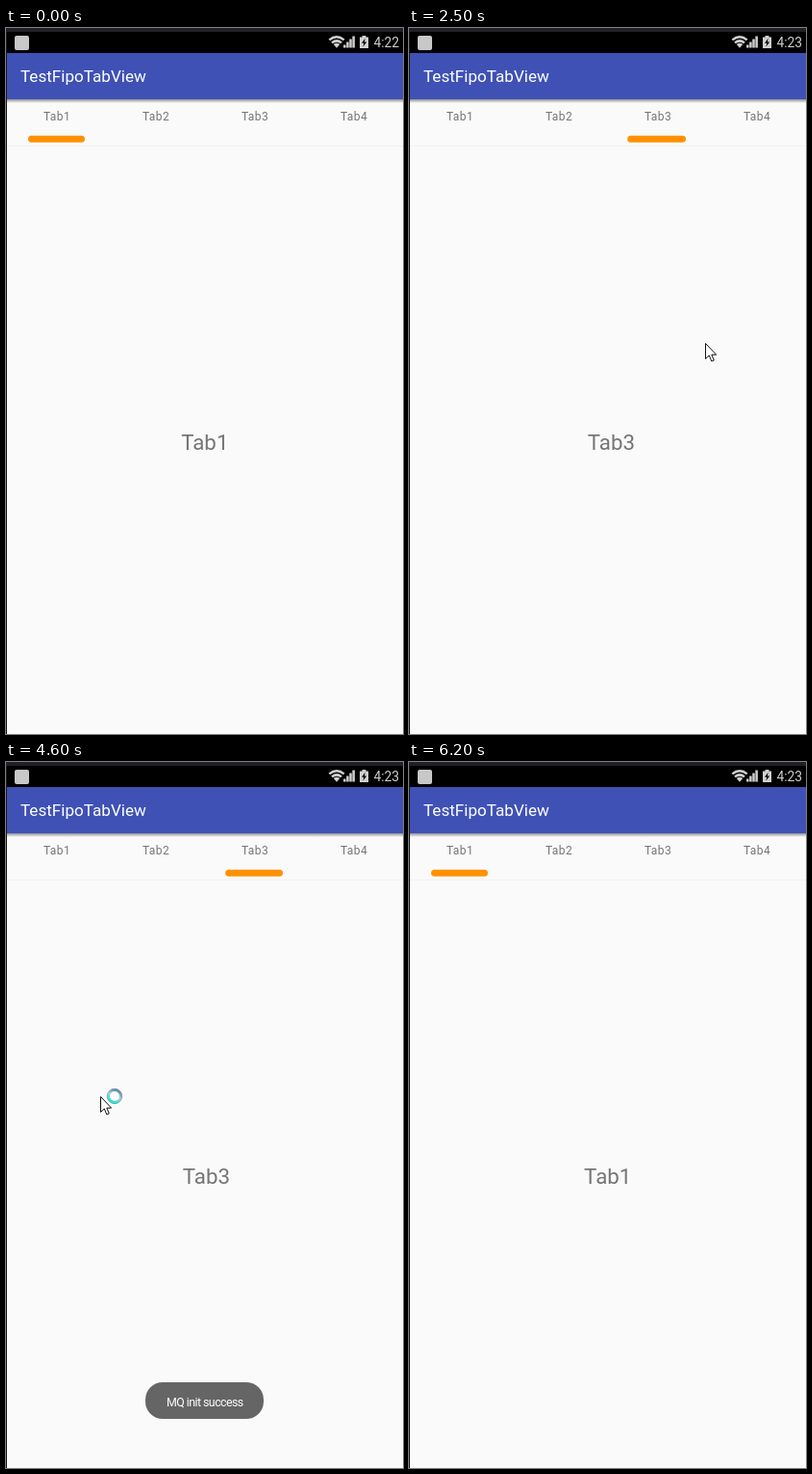
Write an HTML page that moves like this. It is 413 px wide and 733 px high and loops after 7200 ms.

```html
<!DOCTYPE html>
<html lang="en">
<head>
<meta charset="utf-8">
<title>Tab view</title>
<style>
  html, body { margin: 0; width: 100%; height: 100%; overflow: hidden; background: #fafafa; }
  svg { display: block; width: 413px; height: 733px; font-family: Roboto, "Noto Sans", sans-serif; }
  .label, .page { fill: #757575; text-anchor: middle; }
  .label { font-size: 12px; letter-spacing: .4px; }
  .page { font-size: 22.3px; }
</style>
</head>
<body>
<svg viewBox="0 0 413 733">
  <defs>
    <linearGradient id="shade" x2="0" y2="1">
      <stop stop-color="#000" stop-opacity=".42"/>
      <stop offset="1" stop-color="#000" stop-opacity="0"/>
    </linearGradient>
    <linearGradient id="busy" x1=".8" x2=".3" y2="1">
      <stop offset=".1" stop-color="#6790ac"/>
      <stop offset=".5" stop-color="#a9cfda"/>
      <stop offset=".9" stop-color="#2be6d2"/>
    </linearGradient>
  </defs>
  <rect width="413" height="733" fill="#fafafa"/>

  <g id="pages"></g>
  <path d="M0 122.5H413" stroke="#f2f2f2"/>
  <g id="labels"></g>
  <path id="bar" stroke="#ff9100" stroke-width="7" stroke-linecap="round"/>

  <rect y="74" width="413" height="4" fill="url(#shade)"/>
  <rect y="26" width="413" height="48" fill="#3f51b5"/>
  <text x="15" y="56" font-size="17.1" fill="#fff">TestFipoTabView</text>

  <rect width="413" height="26"/>
  <rect width="413" height="4" fill="#202127"/>
  <rect x="9" y="8" width="15" height="15" rx="2" fill="#c8c8c8"/>
  <g fill="none" stroke="#d0d0d0" stroke-width="2.5">
    <path d="M336.3 12.4Q344 6.2 351.7 12.4M339 15.4Q344 11.3 349 15.4"/>
    <path d="M340.8 17Q344 14.6 347.2 17L344 20.8Z" fill="#d0d0d0" stroke="none"/>
    <path d="M352.3 17.5V20.5M355.4 14.5V20.5M358.5 11.5V20.5M361.6 8.5V20.5"/>
  </g>
  <path d="M370.5 8H374.5V9.5H377V21H368V9.5H370.5Z" fill="#d0d0d0"/>
  <path d="M373.6 10.8L370 15.8H372.2L371.4 19.6L375.2 14.4H373Z"/>
  <text id="clock" x="409" y="20" font-size="13.8" fill="#cfcfcf" text-anchor="end"></text>

  <g id="toast">
    <rect x="145" y="644" width="123" height="38" rx="18" fill="#656565"/>
    <text x="167" y="668.5" font-size="12.4" letter-spacing="-.55" fill="#fff">MQ init success</text>
  </g>

  <g id="cursor">
    <path d="M.5 .5V16.5L4.3 13L6.8 19L9.3 18L6.8 12.2H11.6Z" fill="#fff" stroke="#111"/>
    <g id="ring" transform="translate(15)" fill="none">
      <circle r="6.5" fill="#fff" stroke="url(#busy)" stroke-width="2.8"/>
      <circle r="7.8" stroke="#5b7f92" stroke-width=".5"/>
    </g>
  </g>
  <path d="M.5 4V733" stroke="#17171a"/>
</svg>
<script>
const $ = id => document.getElementById(id);
const LOOP = 7200, TICK = 100, PAGE = 412, TAB = 103;

// Ticks at which a swipe is halfway to the next or the previous page
const forward = [14.84, 22.36, 31], back = [35.99, 49.07, 56.9];

// Turning points of the pointer: tick, x, y
const pointer = [
  [2, 278, 227], [6, 106, 339], [7, 106, 340], [10, 268, 341], [11, 268, 341],
  [16, 209, 334], [19, 340, 330], [22, 232, 329], [25, 308, 327], [34, 140, 352],
  [37, 251, 354], [46, 98, 347], [49, 215, 350], [54, 131, 349], [61, 392, 253]
];

const clamp = v => Math.max(0, Math.min(1, v));
const stretch = p => clamp(2 * p + 3.6 * p * p);
const swiped = (n, mids) => mids.reduce((sum, mid) => sum + 1 / (1 + Math.exp(1.8 * (mid - n))), 0);

function pointerAt(n) {
  const i = Math.max(1, pointer.findIndex(k => k[0] >= n));
  const [t0, x0, y0] = pointer[i - 1], [t1, x1, y1] = pointer[i];
  const u = (n - t0) / (t1 - t0);
  return [x0 + (x1 - x0) * u, y0 + (y1 - y0) * u];
}

function addText(parent, cls, x, y, text) {
  const el = document.createElementNS("http://www.w3.org/2000/svg", "text");
  el.setAttribute("class", cls);
  el.setAttribute("x", x);
  el.setAttribute("y", y);
  el.textContent = text;
  $(parent).append(el);
}

for (let i = 0; i < 4; i++) {
  addText("labels", "label", 53 + TAB * i, 96, "Tab" + (i + 1));
  addText("pages", "page", 206.8 + PAGE * i, 438, "Tab" + (i + 1));
}

function draw(now) {
  const n = Math.floor(now % LOOP / TICK);
  const pos = swiped(n, forward) - swiped(n, back);
  const page = Math.floor(pos), p = pos - page;
  $("pages").setAttribute("transform", `translate(${-PAGE * pos})`);

  // The leading end runs ahead, the trailing end catches up
  const left = 26.5 + TAB * (page + 1 - stretch(1 - p));
  const right = 78.5 + TAB * (page + stretch(p));
  $("bar").setAttribute("d", `M${left} 115.2H${right}`);

  const shown = n >= 2 && n < 62;
  $("cursor").style.display = shown ? "" : "none";
  if (shown) $("cursor").setAttribute("transform", `translate(${pointerAt(Math.min(n, 61))})`);
  $("ring").style.display = n >= 45 && n < 56 ? "" : "none";
  $("toast").setAttribute("opacity", clamp(Math.min((n - 33) / 3, (54.6 - n) / 4)));
  $("clock").textContent = n < 23 ? "4:22" : "4:23";
  requestAnimationFrame(draw);
}
draw(0);
</script>
</body>
</html>
```
